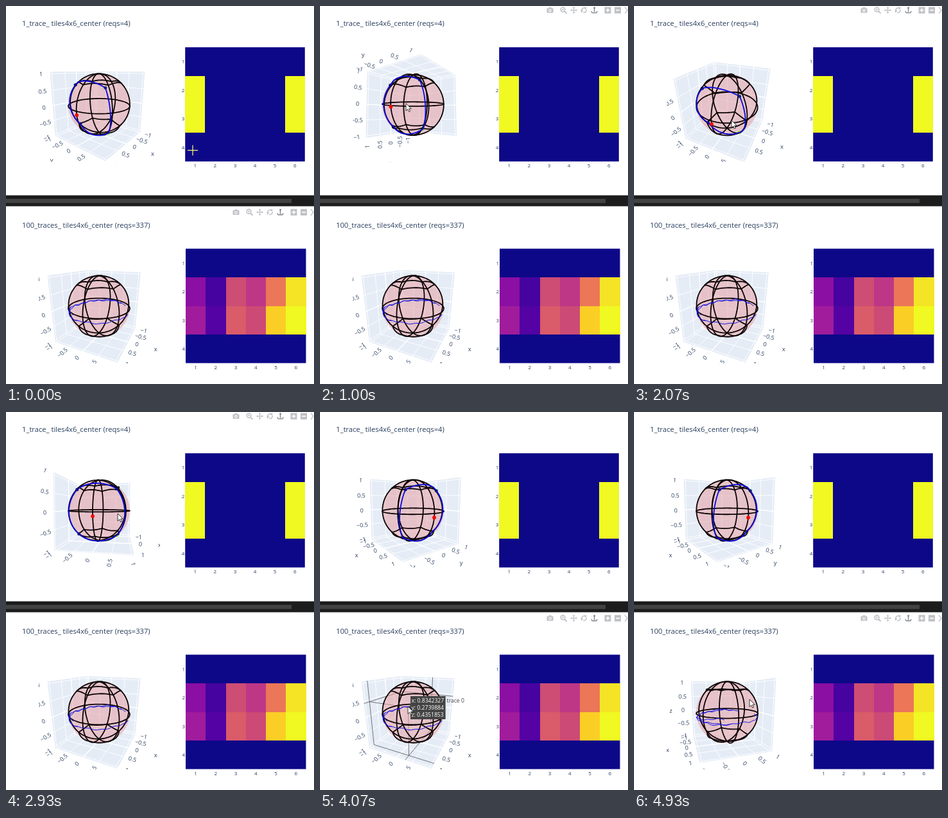
Recreate the animation shown at these times as an HTML page with a canvas. Size 480 by 588 pixels, loop 4990 ms.

```html
<!DOCTYPE html>
<html lang="en">
<head>
<meta charset="utf-8">
<title>Tile traces</title>
<style>
html, body { margin: 0; width: 100%; height: 100%; overflow: hidden; background: #fff; }
canvas { display: block; }
</style>
</head>
<body>
<canvas id="stage" width="480" height="588"></canvas>
<script>
const ctx = document.getElementById('stage').getContext('2d');
const LOOP = 4990, STEP = LOOP / 75;
const DIST = 2.165, FOCAL = 215, R = 0.472, RAD = Math.PI / 180;
const INK = '#2a3f5f', NAVY = '#0d0887', YELLOW = '#f0f921';
const FONT = '"Open Sans", sans-serif';

// time, azimuth, elevation
const VIEW_A = [
  [600, 39, 14], [1000, 38, -4], [1400, 33, -12], [1650, 30.5, 4], [2065, 25.8, 30.2],
  [2400, 23, 28], [2600, 23, 28], [2927, 9.7, 2], [3330, -36, 5.7]
];
const VIEW_B = [[4060, 26.3, 19], [4923, -18, 9]];
// time, x, y
const POINTER = [
  [0, 291, 224], [530, 137, 163], [600, 137, 163], [1400, 131, 140], [1650, 138, 152],
  [2065, 152, 178], [2400, 156, 177], [2600, 156, 177], [2927, 174, 158], [3330, 216, 161],
  [3600, 216, 161], [4000, 137, 458], [4060, 137, 458], [4923, 180, 447]
];

function at(keys, t) {
  if (t <= keys[0][0]) return keys[0].slice(1);
  for (let i = 1; i < keys.length; i++) {
    const a = keys[i - 1], b = keys[i];
    if (t <= b[0]) {
      const k = (t - a[0]) / (b[0] - a[0]);
      return a.slice(1).map((v, j) => v + (b[j + 1] - v) * k);
    }
  }
  return keys[keys.length - 1].slice(1);
}

const ramp = (t, from, len) => Math.max(0, Math.min(1, (t - from) / len));
const unit = p => { const n = Math.hypot(...p); return p.map(v => v / n); };
const ball = (lat, lon) => [
  Math.cos(lat * RAD) * Math.cos(lon * RAD),
  Math.cos(lat * RAD) * Math.sin(lon * RAD),
  Math.sin(lat * RAD)
];

// points on the great circle from a to b
function arc(a, b, n = 12) {
  const out = [];
  const w = Math.acos(a[0] * b[0] + a[1] * b[1] + a[2] * b[2]);
  for (let i = 0; i <= n; i++) {
    const p = Math.sin(w * (1 - i / n)), q = Math.sin(w * i / n);
    out.push(unit(a.map((v, j) => v * p + b[j] * q)));
  }
  return out;
}

function makeCamera(cx, cy, az, el) {
  const ca = Math.cos(az * RAD), sa = Math.sin(az * RAD);
  const ce = Math.cos(el * RAD), se = Math.sin(el * RAD);
  const dir = [ce * ca, ce * sa, se];
  const project = p => {
    const depth = DIST - (p[0] * dir[0] + p[1] * dir[1] + p[2] * dir[2]);
    const x = -sa * p[0] + ca * p[1];
    const y = -se * ca * p[0] - se * sa * p[1] + ce * p[2];
    return [cx + FOCAL * x / depth, cy - FOCAL * y / depth];
  };
  return { project, sign: dir.map(v => v < 0 ? -1 : 1), below: el < 0 };
}

function path(points) {
  ctx.beginPath();
  points.forEach((p, i) => i ? ctx.lineTo(p[0], p[1]) : ctx.moveTo(p[0], p[1]));
}

function stroke(points, color, width) {
  path(points);
  ctx.strokeStyle = color;
  ctx.lineWidth = width;
  ctx.stroke();
}

function dot(p, r, color) {
  ctx.beginPath();
  ctx.arc(p[0], p[1], r, 0, Math.PI * 2);
  ctx.fillStyle = color;
  ctx.fill();
}

function text(s, x, y, size, align = 'center', color = INK) {
  ctx.font = size + 'px ' + FONT;
  ctx.textAlign = align;
  ctx.textBaseline = 'middle';
  ctx.fillStyle = color;
  ctx.fillText(s, x, y + 0.9);
}

function turned(s, x, y, angle) {
  while (angle >= Math.PI / 2) angle -= Math.PI;
  while (angle < -Math.PI / 2) angle += Math.PI;
  ctx.save();
  ctx.translate(x, y);
  ctx.rotate(angle);
  text(s, 0, 0, 9);
  ctx.restore();
}

const point = (axis, v, i, a, j, b) => {
  const p = [0, 0, 0];
  p[axis] = v; p[i] = a; p[j] = b;
  return p;
};

// one edge of the box that carries ticks; short edges get fewer of them
function makeAxis(cam, axis, base, out, gap) {
  const spot = v => {
    const p = base.slice();
    p[axis] = v * R;
    const a = cam.project(p);
    const b = cam.project(p.map((c, i) => c + out[i] * 0.02));
    return { x: a[0], y: a[1], angle: Math.atan2(b[1] - a[1], b[0] - a[0]) };
  };
  const lo = spot(-1), hi = spot(1);
  const short = Math.hypot(hi.x - lo.x, hi.y - lo.y) < 38;
  return { axis, spot, gap, ticks: short ? [-1, 0, 1] : [-1, -0.5, 0, 0.5, 1] };
}

function makeAxes(cam) {
  const [sx, sy, sz] = cam.sign, floor = -sz / 2;
  const left = [sx / 2, -sy / 2, 0], right = [-sx / 2, sy / 2, 0];
  return [
    cam.below
      ? makeAxis(cam, 0, [0, -sy / 2, -.5], [0, 0, -1], 44)
      : makeAxis(cam, 0, [0, sy / 2, floor], [0, sy, 0], 44),
    makeAxis(cam, 1, [sx / 2, 0, floor], [sx, 0, 0], 44),
    // upright axis sits on the left silhouette edge
    cam.project(left)[0] < cam.project(right)[0]
      ? makeAxis(cam, 2, left, [sx, 0, 0], 33)
      : makeAxis(cam, 2, right, [0, sy, 0], 33)
  ];
}

function drawPanes(cam, axes) {
  for (let w = 0; w < 3; w++) {
    const i = (w + 1) % 3, j = (w + 2) % 3, side = -cam.sign[w] / 2;
    const put = (a, b) => cam.project(point(w, side, i, a, j, b));
    path([put(-.5, -.5), put(.5, -.5), put(.5, .5), put(-.5, .5)]);
    ctx.fillStyle = '#e5ecf6';
    ctx.fill();
    for (const v of axes[i].ticks) stroke([put(v * R, -.5), put(v * R, .5)], '#fff', v ? 0.9 : 1.4);
    for (const v of axes[j].ticks) stroke([put(-.5, v * R), put(.5, v * R)], '#fff', v ? 0.9 : 1.4);
  }
}

function drawAxis({ axis, spot, gap, ticks }) {
  for (const v of ticks) {
    const { x, y, angle } = spot(v);
    turned(String(v).replace('-', '\u2212'), x + 14 * Math.cos(angle), y + 14 * Math.sin(angle), angle);
  }
  const { x, y, angle } = spot(0);
  text('xyz'[axis], x + gap * Math.cos(angle), y + gap * Math.sin(angle), 9.5);
}

const tileLines = [];
for (let lon = 0; lon < 360; lon += 60) {
  tileLines.push(arc(ball(-89.9, lon), ball(0, lon), 16), arc(ball(0, lon), ball(89.9, lon), 16));
  for (const lat of [-45, 0, 45]) tileLines.push(arc(ball(lat, lon), ball(lat, lon + 60)));
}

const CENTER = [0.993, 0, -0.114];
const corners = [[-1, 1], [1, 1], [1, -1], [-1, -1]].map(([h, v]) =>
  unit([CENTER[0] + 0.203 * v, 1.527 * h, CENTER[2] + 1.768 * v]));
const outline = corners.flatMap((c, i) => arc(c, corners[(i + 1) % 4]));
const CORNER_COLORS = ['#14143c', '#1c4a2c', '#86e014', '#2a3468'];

function strand(from, to, lat) {
  const out = [];
  for (let lon = from; lon <= to; lon += 4) {
    const wobble = Math.sin(lon * 1.7) + 0.9 * Math.sin(lon * 0.31);
    out.push(ball(lat(lon) + wobble, lon));
  }
  return out;
}
const walks = [
  strand(135, 450, l => -6.5 - 3 * Math.cos((l + 35) * RAD)),
  strand(150, 340, l => -5 + 3 * Math.sin((l - 130) * 2.2 * RAD)),
  strand(285, 350, l => -9 + 2 * Math.sin(l * 3 * RAD))
];

function drawSpikes(cam, pt) {
  const p = pt.map(v => v * R), tip = cam.project(p);
  for (let w = 0; w < 3; w++) {
    const i = (w + 1) % 3, j = (w + 2) % 3, side = -cam.sign[w] / 2;
    const put = (a, b) => cam.project(point(w, side, i, a, j, b));
    stroke([tip, put(p[i], p[j])], '#555', 0.8);
    stroke([put(p[i], -.5), put(p[i], .5)], '#555', 0.8);
    stroke([put(-.5, p[j]), put(.5, p[j])], '#555', 0.8);
  }
}

function drawTip(x, y, rows) {
  ctx.font = '8.6px ' + FONT;
  const w = Math.max(...rows.map(r => ctx.measureText(r).width)) + 4;
  path([[x, y], [x + 4, y - 4], [x + 4, y - 18], [x + 4 + w, y - 18],
    [x + 4 + w, y + 18], [x + 4, y + 18], [x + 4, y + 4]]);
  ctx.fillStyle = '#444';
  ctx.fill();
  rows.forEach((r, i) => text(r, x + 5.5, y - 11 + i * 11, 8.6, 'left', '#fff'));
  text('trace 0', x + w + 6, y - 11, 8.6, 'left', '#444');
}

function drawScene(cx, cy, view, hover, drawUnder, drawOver) {
  const cam = makeCamera(cx, cy, ...view);
  const axes = makeAxes(cam);
  const onBall = p => cam.project(p.map(v => v * R));
  ctx.save();
  ctx.beginPath();
  ctx.rect(51, cy - 90, 189, 179);
  ctx.clip();
  drawPanes(cam, axes);
  axes.forEach(drawAxis);
  if (hover) drawSpikes(cam, hover);
  dot([cx, cy], 48, 'rgba(230,160,165,.55)');
  drawUnder(onBall);
  for (const line of tileLines) stroke(line.map(onBall), '#0a0204', 1.8);
  drawOver(onBall);
  ctx.restore();
}

function drawHeat(x, y, w, h, fill) {
  ctx.fillStyle = NAVY;
  ctx.fillRect(x, y, w * 6, h * 4);
  for (let r = 0; r < 4; r++) {
    text(r + 1, x - 1, y + h * (r + .5), 8, 'right');
    for (let c = 0; c < 6; c++) {
      const color = fill(r, c);
      if (!color) continue;
      const x0 = Math.round(x + c * w), y0 = Math.round(y + r * h);
      ctx.fillStyle = color;
      ctx.fillRect(x0, y0, Math.round(x + (c + 1) * w) - x0, Math.round(y + (r + 1) * h) - y0);
    }
  }
  for (let c = 0; c < 6; c++) text(c + 1, x + w * (c + .5), y + h * 4 + 6.3, 8);
}

const HEAT = [
  ['#8b0fa2', '#46039f', '#cd4d74', '#bd3786', '#eb7658', '#f5e425'],
  ['#a01c9c', '#5402a3', '#da5b69', '#cc4a76', '#fbce25', YELLOW]
];

function drawTools(y, alpha) {
  if (alpha <= 0) return;
  const gray = '#bfc1c5';
  const rect = (x, yy, w, h, c = gray) => { ctx.fillStyle = c; ctx.fillRect(x, yy, w, h); };
  ctx.save();
  ctx.globalAlpha = alpha;
  // camera
  rect(353.5, y - 3, 10, 7);
  rect(356.5, y - 4.5, 4, 2);
  dot([358.5, y + .5], 2.3, '#fff');
  dot([358.5, y + .5], 1.2, gray);
  // magnifier
  ctx.beginPath();
  ctx.arc(378.5, y - 1, 3.4, 0, 7);
  ctx.strokeStyle = gray;
  ctx.lineWidth = 1.6;
  ctx.stroke();
  stroke([[381, y + 1.5], [384.5, y + 5]], gray, 2);
  stroke([[376.8, y - 1], [380.2, y - 1]], gray, 1);
  stroke([[378.5, y - 2.7], [378.5, y + .7]], gray, 1);
  // four-way arrow
  stroke([[391, y], [400, y]], gray, 1.2);
  stroke([[395.5, y - 4.5], [395.5, y + 4.5]], gray, 1.2);
  for (let q = 0; q < 4; q++) {
    const c = Math.round(Math.cos(q * Math.PI / 2)), s = Math.round(Math.sin(q * Math.PI / 2));
    path([[395.5 + 5.5 * c, y + 5.5 * s], [395.5 + 3 * c - 2 * s, y + 3 * s + 2 * c],
      [395.5 + 3 * c + 2 * s, y + 3 * s - 2 * c]]);
    ctx.fillStyle = gray;
    ctx.fill();
  }
  // orbit
  ctx.lineWidth = 1.5;
  ctx.beginPath();
  ctx.arc(411.5, y, 3.6, 2.6, 5.3);
  ctx.stroke();
  ctx.beginPath();
  ctx.arc(411.5, y, 3.6, 5.9, 8.2);
  ctx.stroke();
  path([[406.5, y - 1], [410.5, y + 1], [407, y + 4]]);
  ctx.fill();
  path([[412, y - 5], [416, y - 4], [413.5, y - 1]]);
  ctx.fill();
  // turntable
  const dark = '#83868c';
  rect(426.3, y - 5, 2.6, 2.6, dark);
  stroke([[427.5, y - 4], [427.5, y + 3]], dark, 1.4);
  stroke([[423, y + 1.5], [424, y + 4], [431, y + 4], [432, y + 1.5]], dark, 1.4);
  // plus, minus
  for (const x of [448.5, 464]) {
    rect(x - 5, y - 5, 10, 10);
    rect(x - 3, y - .8, 6, 1.6, '#fff');
  }
  rect(447.7, y - 3, 1.6, 6, '#fff');
  stroke([[475, y - 5], [479, y], [475, y + 5]], gray, 1.3);
  ctx.restore();
}

function drawPointer(x, y) {
  if (x > 279) {
    stroke([[x - 8, y + .5], [x + 8, y + .5]], '#f2f278', 1.3);
    stroke([[x, y - 7.5], [x, y + 8.5]], '#f2f278', 1.3);
    return;
  }
  path([[0, 0], [0, 11.5], [2.7, 9], [4.6, 13], [6.5, 12.2], [4.7, 8.3], [8.3, 8.2]]
    .map(p => [p[0] + x, p[1] + y]));
  ctx.closePath();
  ctx.fillStyle = '#fff';
  ctx.fill();
  ctx.strokeStyle = '#222';
  ctx.lineWidth = 0.9;
  ctx.stroke();
}

function drawMarks(put) {
  corners.forEach((c, i) => dot(put(c), 2.5, CORNER_COLORS[i]));
}

function drawOutline(put) {
  stroke([...outline, outline[0]].map(put), '#0808e0', 1.8);
  dot(put(CENTER), 2.9, '#f00a0a');
}

function drawWalks(put) {
  for (const w of walks) stroke(w.map(put), '#1414e0', 1);
}

function draw(t) {
  ctx.fillStyle = '#fff';
  ctx.fillRect(0, 0, 480, 588);
  ctx.lineJoin = 'round';

  text('1_trace_ tiles4x6_center (reqs=4)', 25, 27, 11.2, 'left');
  text('100_traces_ tiles4x6_center (reqs=337)', 25, 341, 11.2, 'left');
  ctx.fillStyle = '#1c1c1c';
  ctx.fillRect(0, 294.5, 480, 17);
  ctx.fillStyle = '#424242';
  ctx.fillRect(0, 300, 445, 6.5);

  drawHeat(279.2, 64.2, 31.1, 44.4, (r, c) => (r === 1 || r === 2) && c % 5 === 0 && YELLOW);
  drawHeat(280, 377.5, 31.25, 44.5, (r, c) => HEAT[r - 1] && HEAT[r - 1][c]);

  const top = ramp(t, 60, 300) * (1 - ramp(t, 3650, 300));
  drawTools(6.6, top);
  drawTools(320.8, 1 - top);

  const tipA = t > 520 && t < 610, tipB = t > 3980 && t < 4070;
  drawScene(145, 153.3, at(VIEW_A, t), tipA && [0.8536789, 0.4749742, 0.07766496], drawMarks, drawOutline);
  drawScene(145, 467.2, at(VIEW_B, t), tipB && [0.8342327, 0.2739884, 0.4351853], () => {}, drawWalks);
  if (tipA) drawTip(136.5, 163, ['x: 0.8536789', 'y: 0.4749742', 'z: 0.07766496']);
  if (tipB) drawTip(137, 460, ['x: 0.8342327', 'y: 0.2739884', 'z: 0.4351853']);
  drawPointer(...at(POINTER, t));
}

const start = performance.now();
function tick() {
  const t = (performance.now() - start) % LOOP;
  draw(Math.min(74, Math.floor((t + 4) / STEP)) * STEP);
  requestAnimationFrame(tick);
}
tick();
</script>
</body>
</html>
```
